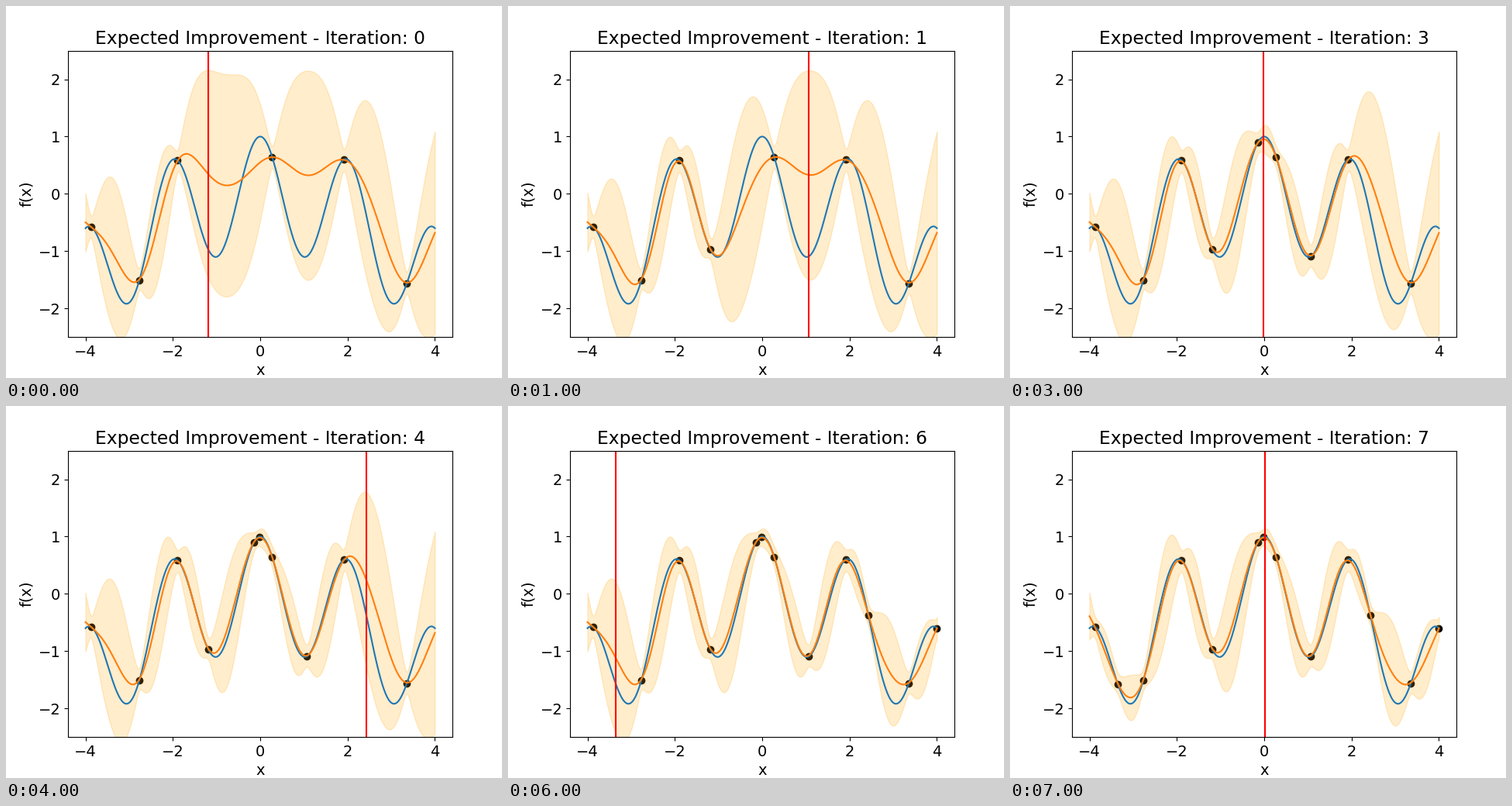
Recreate the animation shown at these times as a matplotlib script. Size 640x480 px, loop 8 s.

```python
import numpy as np
import matplotlib.pyplot as plt
from matplotlib.animation import FuncAnimation

plt.rcParams.update({"font.family": "DejaVu Sans", "font.size": 14})

LENGTH, NOISE = 0.5, 0.1
START = [-3.876, -2.767, -1.892, 0.273, 1.919, 3.355]
QUERIES = [-1.19, 1.064, -0.142, -0.012, 2.431, 4.0, -3.352, 0.018]

grid = np.linspace(-4, 4, 1000)


def objective(x):
    return np.cos(np.pi * x) - 0.1 * x**2


def kernel(a, b):
    return np.exp(-0.5 * ((a[:, None] - b[None, :]) / LENGTH) ** 2)


def posterior(xs):
    """Mean and deviation of a zero-mean Gaussian process on the grid."""
    cov = kernel(xs, xs) + NOISE**2 * np.eye(len(xs))
    cross = kernel(grid, xs)
    weights = np.linalg.solve(cov, cross.T).T
    mean = weights @ objective(xs)
    var = 1 - np.sum(weights * cross, axis=1)
    return mean, np.sqrt(np.maximum(var, 0))


fig, ax = plt.subplots(figsize=(6.4, 4.8), dpi=100)


def draw(step):
    ax.clear()
    xs = np.array(START + QUERIES[:step])
    mean, dev = posterior(xs)
    ax.scatter(xs, objective(xs), color="black")
    ax.plot(grid, objective(grid), color="C0")
    ax.plot(grid, mean, color="C1")
    ax.fill_between(grid, mean - 1.96 * dev, mean + 1.96 * dev,
                    color="orange", alpha=0.2)
    ax.axvline(QUERIES[step], color="red")
    ax.set(xlim=(-4.4, 4.4), ylim=(-2.5, 2.5), xlabel="x", ylabel="f(x)",
           title=f"Expected Improvement - Iteration: {step}")


anim = FuncAnimation(fig, draw, frames=len(QUERIES), init_func=lambda: None,
                     interval=1000, repeat=True, repeat_delay=0)
plt.show()
```
